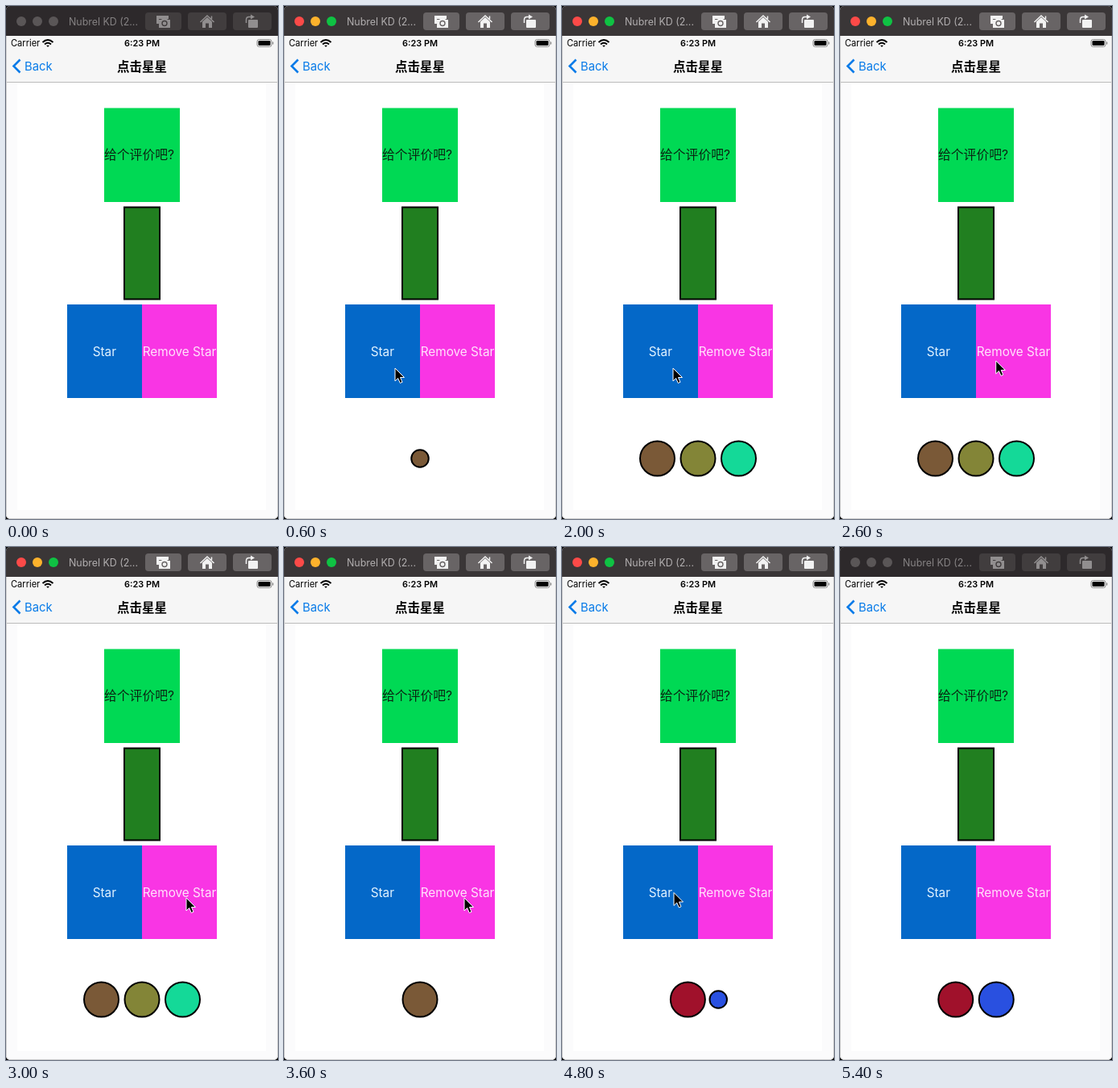
Write an HTML page that moves like this. It is 338 by 636 pixels and loops after 5.6 s.

```html
<!DOCTYPE html>
<html lang="zh">
<head>
<meta charset="utf-8">
<style>
  html, body { margin: 0; width: 100%; height: 100%; overflow: hidden; background: #000; }
  svg { display: block; width: 100%; height: 100%; font-family: Inter, "Noto Sans CJK SC", "Noto Sans CJK", sans-serif; }
  .mid { text-anchor: middle; }
  #bar { --bar: #3a3637; --title: #b1aeaf; --button: #686465; --icon: #f2f2f2; }
  #bar.idle { --bar: #2d292b; --title: #858283; --button: #413d3e; --icon: #918e8f; }
  #bar.idle .light { fill: #5a5657; }
  .button { fill: var(--button); }
  .icon { fill: var(--icon); }
  .cut { fill: none; stroke: var(--button); stroke-width: 1.4; }
  .line { fill: none; stroke: var(--icon); stroke-width: 1.5; }
</style>
</head>
<body>
<svg viewBox="0 0 338 636">
  <clipPath id="window"><rect width="338" height="636" rx="5"/></clipPath>
  <g clip-path="url(#window)">
    <rect width="338" height="636" fill="#fbfbfc"/>
    <rect x="14" y="95" width="309" height="530" fill="#fff"/>
    <rect y="37" width="338" height="57" fill="#f6f6f6"/>
    <path d="M0 94.5H338" stroke="#bcbcbc"/>
    <path d="M.5 37V631Q.5 635.5 5 635.5H333Q337.5 635.5 337.5 631V37" fill="none" stroke="#cfcfd0"/>

    <g id="bar">
      <rect width="338" height="37" fill="var(--bar)"/>
      <circle class="light" cx="19" cy="19" r="6" fill="#fc4a48"/>
      <circle class="light" cx="39" cy="19" r="6" fill="#fdb22c"/>
      <circle class="light" cx="59" cy="19" r="6" fill="#0fc243"/>
      <text x="78" y="24" font-size="12.4" fill="var(--title)">Nubrel KD (2...</text>
      <rect class="button" x="173" y="8" width="45" height="22" rx="4"/>
      <rect class="button" x="226" y="8" width="48" height="22" rx="4"/>
      <rect class="button" x="282" y="8" width="48" height="22" rx="4"/>
      <path class="icon" d="M187 12H202V16H190V22H187Z"/>
      <path class="icon" d="M190 17H193L194.5 15H199.5L201 17H204V27H190Z"/>
      <circle class="cut" cx="197" cy="21.5" r="3"/>
      <path class="line" d="M241.5 20L250 12L258.5 20M255.5 16V12.5"/>
      <path class="icon" d="M244 19.5L250 14L256 19.5V27H252V21.5H248V27H244Z"/>
      <rect class="icon" x="301" y="17" width="12" height="10" rx="1"/>
      <path class="line" d="M298.5 21V17Q298.5 13.5 302 13.5H305"/>
      <path class="icon" d="M304 10.5L309 13.5L304 16.5Z"/>
    </g>

    <text x="6" y="50" font-size="11.1">Carrier</text>
    <g fill="none" stroke="#000" stroke-width="2">
      <path d="M45.5 45Q52 39 58.5 45M48 47.5Q52 44 56 47.5"/>
      <path d="M50 48.8H54L52 51Z" fill="#000" stroke="none"/>
    </g>
    <text class="mid" x="169" y="50" font-size="10.9" font-weight="600">6:23 PM</text>
    <rect x="312" y="41.5" width="18" height="9" rx="2.5" fill="none" stroke="#8c8c8c"/>
    <rect x="313.5" y="43" width="15" height="6" rx="1.3"/>
    <path d="M331.7 44.5V47.5" stroke="#8c8c8c" stroke-width="1.3"/>

    <path d="M17.5 66.5L9.5 74.5L17.5 82.5" fill="none" stroke="#087be8" stroke-width="2.6"/>
    <text x="23" y="80" font-size="14.8" fill="#087be8">Back</text>
    <text class="mid" x="169" y="81" font-size="15.5" font-weight="600">点击星星</text>

    <rect x="122" y="126.5" width="94" height="116.5" fill="#00d954"/>
    <text x="122" y="190" font-size="15.8" fill="#0a2412">给个评价吧?</text>
    <rect x="147" y="249.5" width="44" height="114" fill="#217f20" stroke="#000" stroke-width="2"/>
    <rect x="76" y="370" width="93" height="116" fill="#0468c8"/>
    <rect x="169" y="370" width="93" height="116" fill="#f935e4"/>
    <g class="mid" font-size="15.3">
      <text x="122.3" y="434" fill="#e2f3ff">Star</text>
      <text x="215.5" y="434" fill="#ffe3fb">Remove Star</text>
    </g>

    <g id="stars" stroke="#000" stroke-width="2"></g>
    <path id="cursor" d="M0 0V16L3.7 12.5L6.3 18.5L9 17.3L6.5 11.5H11.5Z" stroke="#fff" stroke-width="1"/>
  </g>
</svg>
<script>
const LOOP = 5600, STEP = 200, GAP = 50.5;
const $ = id => document.getElementById(id);

// colour, time added, time removed
const stars = [
  ['#7a5937', 500, 3700],
  ['#838537', 1000, 3400],
  ['#14d998', 1700, 3100],
  ['#a0112b', 4200, LOOP],
  ['#2950e0', 4700, LOOP]
].map(([fill, from, to]) => {
  const node = document.createElementNS('http://www.w3.org/2000/svg', 'circle');
  node.setAttribute('fill', fill);
  node.setAttribute('cy', 561);
  $('stars').append(node);
  return { node, from, to };
});

// start, end, target of each pointer move
const moves = [
  [200, 600, 138, 449],
  [2300, 2800, 224, 435],
  [3900, 4200, 139, 428.5]
];

function ease(t, start, end) {
  const p = Math.min(1, Math.max(0, (t - start) / (end - start)));
  return p * p * (3 - 2 * p);
}

function pointer(t) {
  let x = 152, y = 480;
  for (const [start, end, toX, toY] of moves) {
    const p = ease(t, start, end);
    x += (toX - x) * p;
    y += (toY - y) * p;
  }
  return `translate(${x} ${y})`;
}

function draw(now) {
  const t = Math.floor(now % LOOP / STEP) * STEP;
  const idle = t < 200 || t >= 5400;
  $('bar').classList.toggle('idle', idle);
  $('cursor').style.display = idle ? 'none' : '';
  $('cursor').setAttribute('transform', pointer(t));

  // Each star takes up a share of the row as it grows or shrinks.
  const sizes = stars.map(s => ease(t, s.from, s.from + 200) - ease(t, s.to, s.to + 200));
  let x = 169 - GAP * sizes.reduce((a, b) => a + b) / 2;
  stars.forEach(({ node }, i) => {
    const size = sizes[i];
    node.style.display = size ? '' : 'none';
    node.setAttribute('cx', x + GAP * size / 2);
    node.setAttribute('r', 21.5 * size);
    x += GAP * size;
  });
}

const begin = performance.now();
function tick() {
  draw(performance.now() - begin);
  requestAnimationFrame(tick);
}
tick();
</script>
</body>
</html>
```
